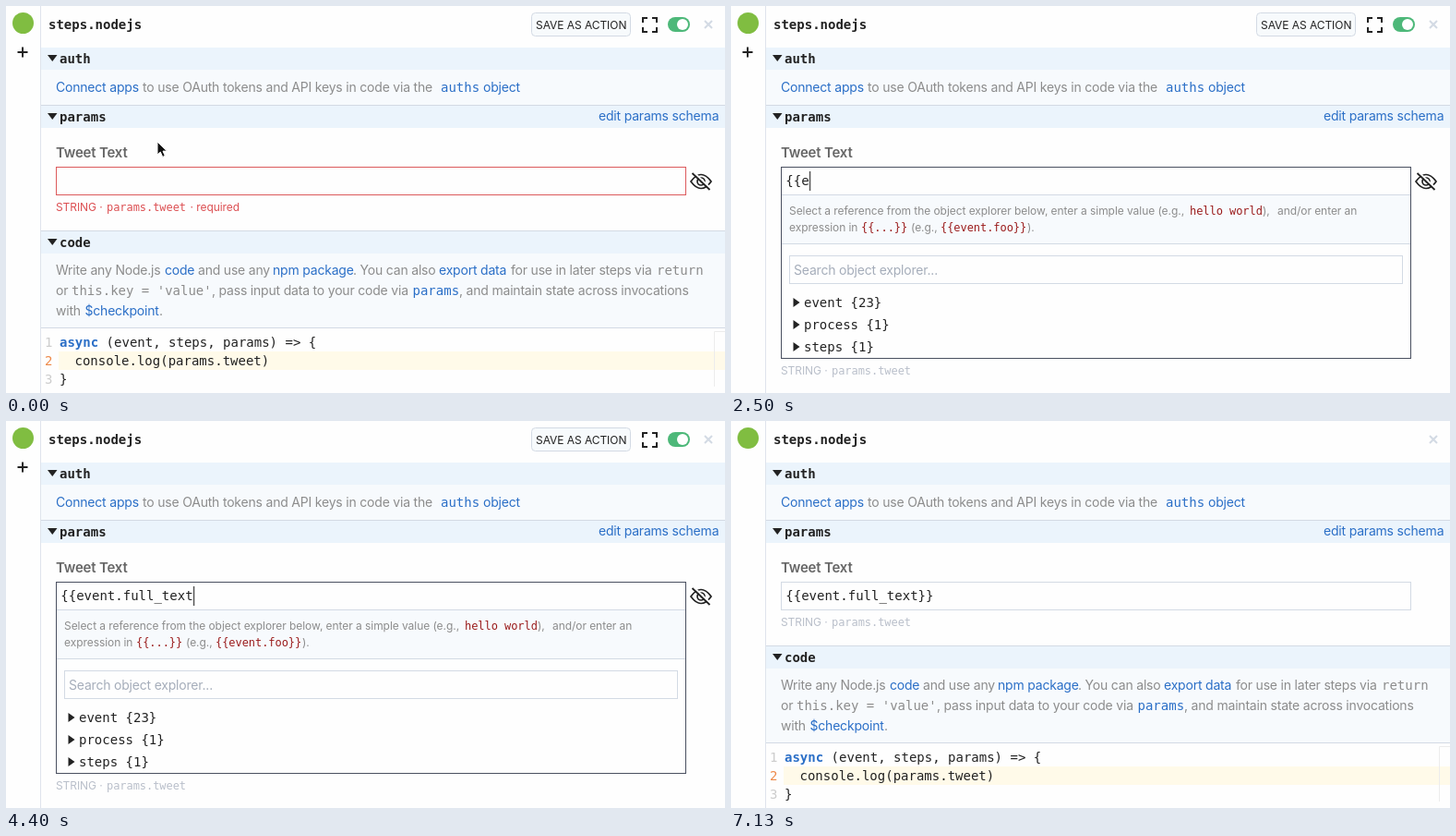
Animation of 779 by 419 pixels, one loop 10000 ms. Source, as an HTML page:

```html
<!DOCTYPE html>
<html lang="en">
<head>
<meta charset="utf-8">
<style>
html, body { margin: 0; width: 100%; height: 100%; overflow: hidden; background: #fefefe; }
svg { display: block; width: 779px; height: 419px; }
text { font: 14px Inter, sans-serif; letter-spacing: -.2px; fill: #8c8c8c; white-space: pre; }
.mono { font-family: "DejaVu Sans Mono", monospace; letter-spacing: 0; }
.bold { font-weight: 700; }
.dark { fill: #222; }
.link { fill: #2b6fc7; }
.small { font-size: 12px; letter-spacing: -.06px; }
.red { fill: #9b1c1c; }
.label { font-size: 15px; font-weight: 600; fill: #666; }
.hint { fill: #a5adba; }
.band { fill: #ebf4fc; }
.body { fill: #f7fafd; }
.line { fill: none; stroke: #d3dae4; }
.icon { fill: none; stroke: #222; stroke-width: 2; }
</style>
</head>
<body>
<svg id="stage" viewBox="0 0 779 419"></svg>
<script>
const LOOP = 10000;
const text = (x, y, s, cls = '') => `<text x="${x}" y="${y}" class="${cls}">${s}</text>`;
const rect = (x, y, w, h, cls, more = '') =>
  `<rect x="${x}" y="${y}" width="${w}" height="${h}" class="${cls}" ${more}/>`;
const path = (d, cls, more = '') => `<path d="${d}" class="${cls}" ${more}/>`;
const group = (id, ...parts) => `<g id="${id}">${parts.join('')}</g>`;

const heading = (y, title) => rect(38, y, 741, 24, 'band') +
  path(`M45 ${y + 8}h10.5l-5.25 7z`, 'dark') + text(58, y + 17, title, 'mono bold dark');
const treeRow = (y, s) => path(`M67.5 ${y - 10}v10l7-5z`, 'dark') + text(79, y, s, 'mono dark');

const header = rect(37, 0, 1, 419, '', 'fill="#dfe4ec"') +
  '<circle cx="18.5" cy="18.5" r="11.5" fill="#80bd41"/>' +
  text(46, 25, 'steps.nodejs', 'mono bold dark') +
  path('M757 16l8 8m0-8l-8 8', 'line', 'stroke-width="2"');

const controls = group('controls',
  path('M12.5 50h11M18 44.5v11', 'icon', 'stroke-width="1.6"'),
  rect(569.5, 7.5, 107, 25, 'line', 'rx="4" style="fill:#f7fafc"'),
  text(574, 24.5, 'SAVE AS ACTION', 'small dark'),
  path('M690 18v-5h5M700 13h5v5M705 23v5h-5M695 28h-5v-5', 'icon'),
  rect(717, 12, 24, 16, '', 'rx="8" fill="#4db879"'),
  '<circle cx="733" cy="20" r="6" fill="#fff"/>',
  path('M742 190q11 -15 22 0q-11 15 -22 0z', 'icon', 'style="stroke-width:1.7"'),
  '<circle cx="753" cy="190" r="4" class="icon" style="stroke-width:1.7"/>',
  path('M745 180l19 18', '', 'stroke="#fefefe" stroke-width="2"'),
  path('M743.5 181l19 18', 'icon', 'style="stroke-width:1.8"'));

const auth = heading(45, 'auth') + rect(38, 69, 741, 38, 'body') +
  text(54, 93, 'Connect apps', 'link') +
  text(148, 93, 'to use OAuth tokens and API keys in code via the') +
  text(471, 93, 'auths', 'mono link') + text(517, 93, 'object', 'link') +
  path('M38 107.5h741', 'line');

const params = heading(108, 'params') + text(642, 124, 'edit params schema', 'link') +
  text(54, 164, 'Tweet Text', 'label');

const code = group('code',
  path('M38 243.5h741M38 348.5h741', 'line'),
  heading(244, 'code'), rect(38, 268, 741, 80, 'body'),
  text(54, 291, 'Write any Node.js'), text(172, 291, 'code', 'link'),
  text(208, 291, 'and use any'), text(289, 291, 'npm package', 'link'),
  text(376, 291, '. You can also'), text(469, 291, 'export data', 'link'),
  text(547, 291, 'for use in later steps via'), text(705, 291, 'return', 'mono'),
  text(54, 313, 'or'), text(71, 313, "this.key = 'value'", 'mono'),
  text(223, 313, ', pass input data to your code via'),
  text(440.5, 313, 'params', 'mono link'),
  text(491, 313, ', and maintain state across invocations'),
  text(54, 335, 'with'), text(85.5, 335, '$checkpoint', 'link'), text(166, 335, '.'),
  rect(57, 374, 722, 20, '', 'fill="#fffae9"'),
  path('M779 352.5h-11.5V412', '', 'fill="none" stroke="#ececec"'),
  text(42, 369, '1', 'mono" style="fill:#ccc'),
  text(42, 389, '2', 'mono" style="fill:#ee8a4a'),
  text(42, 409, '3', 'mono" style="fill:#ccc'),
  text(58, 369, 'async', 'mono bold link'),
  text(108.6, 369, '(event, steps, params) =&gt; {', 'mono dark'),
  text(74.5, 389, 'console.log(params.tweet)', 'mono dark'),
  text(58, 409, '}', 'mono dark'));

const explorer = group('explorer',
  rect(55, 205, 681, 52, 'body'),
  path('M55 204.5h681M55 257.5h681', 'line'),
  text(63, 226, 'Select a reference from the object explorer below, enter a simple value (e.g.,', 'small'),
  text(497, 226, 'hello world', 'mono small red'),
  text(576, 226, '),', 'small'), text(592, 226, 'and/or enter an', 'small'),
  text(63, 244, 'expression in', 'small'), text(141, 244, '{{...}}', 'mono small red'),
  text(195, 244, '(e.g.,', 'small'), text(227, 244, '{{event.foo}}', 'mono small red'),
  text(321, 244, ').', 'small'),
  rect(63.5, 270.5, 664, 30, 'line'), text(68, 291, 'Search object explorer...', 'hint'),
  treeRow(326, 'event {23}'), treeRow(350, 'process {1}'), treeRow(374, 'steps {1}'));

const field = rect(54.5, 174.5, 682, 30, '', 'id="frame" fill="none"') +
  '<text id="value" x="59.3" y="194" class="mono dark"></text>' +
  rect(0, 179, 1.5, 21, '', 'id="caret" fill="#555"') +
  group('note', text(54, 0, 'STRING ·', 'small'), text(109, 0, 'params.tweet', 'mono small'),
    group('required', text(199.5, 0, '· required', 'small')));

const pointers =
  path('M0 0v14l3.3-3 2.4 5.4 2.6-1.1-2.3-5.2h4.4z', '', 'id="arrow" fill="#111" stroke="#fff"') +
  path('M-3.5 -7.5q3 0 3.5 1.5q.5-1.5 3.5-1.5M0 -6V6M-3.5 7.5q3 0 3.5-1.5q.5 1.5 3.5 1.5M-2 1.5h4',
    '', 'id="beam" fill="none" stroke="#222" stroke-width="1.4"') +
  path('M-1.6 8V1.5a1.6 1.6 0 0 1 3.2 0V6.5a1.5 1.5 0 0 1 2.8 .4a1.5 1.5 0 0 1 2.8 .6a1.4 1.4 0 0 1 2.4 1.2V11L8 16H0L-4.6 10.5a1.5 1.5 0 0 1 2-2z',
    '', 'id="hand" fill="#fff" stroke="#222" stroke-width="1.3"');

const $ = id => document.getElementById(id);
$('stage').innerHTML = header + controls + auth + params + code + explorer + field + pointers;
const noteTexts = document.querySelectorAll('#note text');

// [time, typed value]
const typing = [[0, ''], [1900, '{'], [2130, '{{'], [2430, '{{e'], [2860, '{{event'],
  [3800, '{{event.'], [3960, '{{event.f'], [4130, '{{event.fu'], [4400, '{{event.full_text'],
  [5330, '{{event.full_text}'], [5500, '{{event.full_text}}']];
// [time, x, y]
const route = [[530, 164, 147], [930, 107, 186], [5930, 107, 186], [6230, 147, 145], [6900, 232, 2]];

const last = (list, t) => list.filter(k => k[0] <= t).pop();
const show = (id, on) => { $(id).style.display = on ? '' : 'none'; };

function pointerAt(t) {
  const a = last(route, t) || route[0];
  const b = route.find(k => k[0] > t) || a;
  let p = a === b ? 0 : (t - a[0]) / (b[0] - a[0]);
  if (a === route[0]) p = p > 0 ? p * p * (3 - 2 * p) : 0;
  return [a[1] + (b[1] - a[1]) * p, a[2] + (b[2] - a[2]) * p];
}

function draw(t) {
  const open = t >= 1060 && t < 7030;
  const [since, value] = last(typing, t);
  const invalid = t < 2130;
  show('controls', t < 6930);
  show('code', !open);
  show('explorer', open);

  $('value').textContent = value;
  $('caret').setAttribute('x', 59.5 + value.length * 8.43);
  const blink = t - Math.max(since, 1060);
  show('caret', open && blink % 1000 < (t < 1900 ? 440 : 500) && !(t > 5930 && t < 6500));

  const color = invalid ? '#dc5a5c' : open ? '#4a5060' : '#d3dae4';
  $('frame').setAttribute('stroke', color);
  $('frame').setAttribute('height', open ? 207 : 30);
  $('note').setAttribute('transform', `translate(0 ${open ? 399 : 222})`);
  noteTexts.forEach(n => { n.style.fill = invalid ? '#dc4f52' : '#b9bfca'; });
  show('required', invalid);

  const [x, y] = pointerAt(t);
  const visible = t < 1900 || (t >= 5930 && t < 6930);
  const shape = y > 174 ? 'beam' : x < 155 && y > 142 ? 'hand' : 'arrow';
  for (const id of ['arrow', 'beam', 'hand']) {
    show(id, visible && id === shape);
    $(id).setAttribute('transform', `translate(${x} ${y})`);
  }
}

const start = performance.now();
function tick() {
  draw((performance.now() - start) % LOOP);
  requestAnimationFrame(tick);
}
tick();
</script>
</body>
</html>
```
